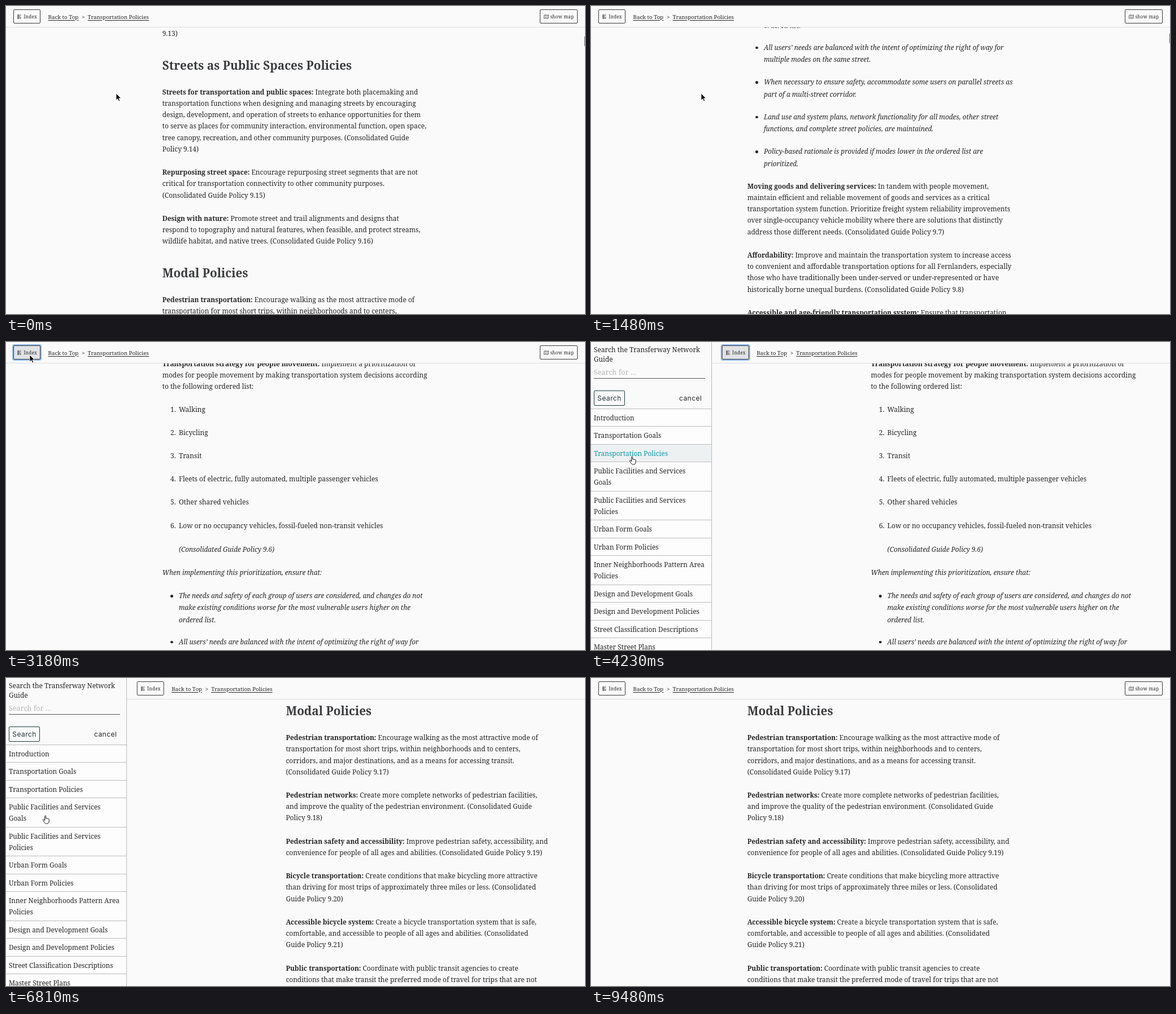
An HTML page for the animation above (9.71 s loop, 1025 px wide and 546 px high).

```html
<!DOCTYPE html>
<html lang="en">
<head>
<meta charset="utf-8">
<title>Policy reader</title>
<style>
html, body { margin: 0; width: 100%; height: 100%; overflow: hidden; background: #fafafa; }
body { position: relative; font: 11.95px/20.25px "Noto Serif", serif; color: #262626; white-space: nowrap; }
#page, #doc, #side, #side > *, #bar, #bar > *, #doc > *, #thumb, #cursor { position: absolute; }
#page { left: 0; top: 0; width: 1025px; height: 546px; }
#doc { left: 276.7px; top: 0; width: 473px; }
#doc h1, #doc h2 { margin: 0; line-height: 30px; color: #3b3c3e; }
#doc h1 { font-size: 23.1px; }
#doc h2 { font-size: 20.75px; }
#doc p { margin: 0; }
#doc b { font-size: 11.85px; }
#doc i { font-size: 11.78px; }
#doc hr { margin: 0; border: 0; width: 473px; height: 6px; background: #00a0ae; }
#doc .in { left: 29.2px; }
#doc .mark { position: absolute; left: -14.8px; }
#doc .dot { position: absolute; left: -14.5px; top: 9px; width: 4.4px; height: 4.4px; border-radius: 50%; background: #262626; }
#bar { left: -5px; top: 0; width: 1035px; height: 37px; background: #fafafa; border-bottom: 1px solid #dedede; }
.btn { box-sizing: border-box; top: 6px; height: 25px; border: 1px solid #3a3a3a; border-radius: 2px;
  font-size: 8px; line-height: 23px; letter-spacing: .35px; padding-left: 17px; }
.btn svg { position: absolute; left: 6px; top: 8px; }
.focus { background: #e0e2e4; box-shadow: 0 0 0 2px #8ab6ee; }
.crumb { top: 9.5px; font-size: 9.8px; }
u { text-underline-offset: 2px; }
#side { left: 0; top: 0; width: 213px; height: 546px; overflow: hidden; background: #fafafa; border-right: 1px solid #bbb; }
#title { left: 5px; top: 4.5px; line-height: 17px; }
#field { left: 5px; top: 44px; width: 197px; height: 20px; font-size: 12.5px; color: #b9b9b9; border-bottom: 1px solid #555; }
.ui { top: 86px; font: 400 12px/25px Inter, sans-serif; letter-spacing: .45px; }
#go { left: 5px; box-sizing: border-box; width: 55px; height: 27px; border: 1px solid #1f3a3a; border-radius: 2px; text-align: center; color: #1f3434; }
#cancel { left: 156px; top: 87px; }
.list { left: 0; top: 118px; width: 213px; border-top: 1px solid #bbb; background: #fdfdfd; }
.list div { padding: 5.075px 5px; border-bottom: 1px solid #bbb; font-size: 11.85px; }
.list .on { color: #0a99a6; }
#main .on:nth-child(3) { background: #eef1f2; }
#fig { left: 0; top: 0; font-family: "Liberation Sans", Arial, sans-serif; font-size: 4.75px; fill: #222; }
#fig .b { font-weight: bold; font-size: 4.6px; }
#fig .m { text-anchor: middle; }
#fig .i { font-style: italic; font-size: 4.1px; }
#thumb { right: 0; width: 1.5px; height: 17px; background: #666; }
#cursor { left: 0; top: 0; overflow: visible; }
</style>
</head>
<body>
<div id="page">
  <div id="doc"></div>
  <div id="bar">
    <div id="index" class="btn" style="left:18.4px;width:48px"><svg width="8" height="8"><path d="M0 1h7M0 3h5M0 5h7M0 7h7M1.5 0v8" stroke="#333" fill="none" stroke-width=".8"/></svg>Index</div>
    <u class="crumb" style="left:79.5px">Back to Top</u>
    <span class="crumb" style="left:139px">&gt;</span>
    <u class="crumb" style="left:149.5px">Transportation Policies</u>
    <div class="btn" style="left:950.4px;width:67px"><svg width="9" height="8"><path d="M.5 1.5 3 .7 6 1.5 8.5 .7V6.5L6 7.3 3 6.5 .5 7.3ZM3 .7V6.5M6 1.5V7.3" stroke="#333" fill="none" stroke-width=".7"/></svg>show map</div>
  </div>
</div>
<div id="side">
  <div id="title">Search the Transferway Network<br>Guide</div>
  <div id="field">Search for …</div>
  <div id="go" class="ui">Search</div>
  <div id="cancel" class="ui">cancel</div>
  <div id="main" class="list"></div>
  <div id="sub" class="list"></div>
  <svg id="fig" width="213" height="546"></svg>
</div>
<div id="thumb"></div>
<svg id="cursor" width="14" height="16">
  <path id="arrow" d="M0 0V12L2.8 9.4 4.7 13.8 6.7 13 4.8 8.7H8.6Z" fill="#000" stroke="#fff" stroke-width=".8"/>
  <path id="hand" d="M3.6 1.2c0-1.4 2-1.4 2 0v4c.3-.9 1.8-.8 1.9 .2 .4-.8 1.8-.6 1.9 .4 .5-.7 1.8-.3 1.8 .8v3c0 2.6-1.5 4.6-3.9 4.6H6.3c-1.5 0-2.3-.8-3.2-2.2L.6 8.3c-.8-1.3 .7-2.1 1.6-1.1l1.4 1.5z" fill="#fff" stroke="#111"/>
</svg>
<script>
const $ = id => document.getElementById(id);
const LOOP = 9710, LINE = 20.25, GAP = 20.95, SHIFT = 218.7;
const br = s => s.replaceAll('|', '<br>');
const ref = n => `(Consolidated Guide Policy 9.${n})`;

// [kind, text, marker or anchor]
const blocks = [
  ['hr', '', 'top'],
  ['h1', 'Transportation Policies'],
  ['p', '(Consolidated Guide Chapter 9)'],
  ['h2', 'Design and Planning Policies'],
  ['p', `<b>Street design classifications:</b> Maintain and implement street design|classifications consistent with land use plans, environmental context, urban design|pattern areas, and the Neighborhood Corridor and Civic Corridor Urban Design|Framework designations. ${ref(1)}`],
  ['p', `<b>Street policy classifications:</b> Maintain and implement street policy classifications|for pedestrian, bicycle, transit, freight, emergency vehicle, and automotive|movement, while considering access for all modes, connectivity, adjacent planned|land uses, and state and regional requirements. ${ref(2)}`],
  ['in', `<b>a:</b> Designate district classifications that emphasize freight mobility and|access in industrial and employment areas serving high levels of truck|traffic and to accommodate the needs of intermodal freight movement.|${ref('2.a')}`],
  ['in', '<b>b:</b> Integrate the needs of all modes of'],
  ['p', '<b>Transportation strategy for people movement:</b> Implement a prioritization of|modes for people movement by making transportation system decisions according|to the following ordered list:'],
  ['in', 'Walking', '1.'],
  ['in', 'Bicycling', '2.'],
  ['in', 'Transit', '3.'],
  ['in', 'Fleets of electric, fully automated, multiple passenger vehicles', '4.'],
  ['in', 'Other shared vehicles', '5.'],
  ['in', 'Low or no occupancy vehicles, fossil-fueled non-transit vehicles', '6.'],
  ['in', `<i>${ref(6)}</i>`],
  ['p', '<i>When implementing this prioritization, ensure that:</i>'],
  ['in', '<i>The needs and safety of each group of users are considered, and changes do not|make existing conditions worse for the most vulnerable users higher on the|ordered list.</i>', '•'],
  ['in', '<i>All users’ needs are balanced with the intent of optimizing the right of way for|multiple modes on the same street.</i>', '•'],
  ['in', '<i>When necessary to ensure safety, accommodate some users on parallel streets as|part of a multi-street corridor.</i>', '•'],
  ['in', '<i>Land use and system plans, network functionality for all modes, other street|functions, and complete street policies, are maintained.</i>', '•'],
  ['in', '<i>Policy-based rationale is provided if modes lower in the ordered list are|prioritized.</i>', '•'],
  ['p', `<b>Moving goods and delivering services:</b> In tandem with people movement,|maintain efficient and reliable movement of goods and services as a critical|transportation system function. Prioritize freight system reliability improvements|over single-occupancy vehicle mobility where there are solutions that distinctly|address those different needs. ${ref(7)}`, 'goods'],
  ['p', `<b>Affordability:</b> Improve and maintain the transportation system to increase access|to convenient and affordable transportation options for all Fernlanders, especially|those who have traditionally been under-served or under-represented or have|historically borne unequal burdens. ${ref(8)}`],
  ['p', `<b>Accessible and age-friendly transportation system:</b> Ensure that transportation|facilities are accessible to people of all ages and abilities, and that all|improvements to the system in the public right-of-way are easy to reach. Adapt|the transportation system to better meet the needs of the most vulnerable|users, including the young, older adults, and people with different abilities.|${ref(9)}`],
  ['p', `<b>Geographic policies:</b> Adopt geographically-specific policies to ensure that|transportation infrastructure reflects the unique topography, historic character,|natural features, system gaps, economic needs, demographics, and land uses of|each area. ${ref(10)}`],
  ['h2', 'Land Use, Development, and Placemaking Policies'],
  ['p', `<b>Land use and transportation coordination:</b> Implement the land use map and|the transportation plans and street classifications through coordinated long-|range planning and investment decisions. ${ref(11)}`],
  ['p', `<b>Growth strategy:</b> Coordinate land use and transportation to support growth|in centers and along corridors. ${ref(12)}`],
  ['p', '<b>Development and street design:</b> Evaluate adjacent land uses to help inform|street classifications in framing street, sidewalk, and trail design and use to|support complementary development. (Consolidated Guide Policy|9.13)'],
  ['h2', 'Streets as Public Spaces Policies', 'streets'],
  ['p', '<b>Streets for transportation and public spaces:</b> Integrate both placemaking and|transportation functions when designing and managing streets by encouraging|design, development, and operation of streets to enhance opportunities for them|to serve as places for community interaction, environmental function, open space,|tree canopy, recreation, and other community purposes. (Consolidated Guide|Policy 9.14)'],
  ['p', `<b>Repurposing street space:</b> Encourage repurposing street segments that are not|critical for transportation connectivity to other community purposes.|${ref(15)}`],
  ['p', `<b>Design with nature:</b> Promote street and trail alignments and designs that|respond to topography and natural features, when feasible, and protect streams,|wildlife habitat, and native trees. ${ref(16)}`],
  ['h2', 'Modal Policies', 'modal'],
  ['p', `<b>Pedestrian transportation:</b> Encourage walking as the most attractive mode of|transportation for most short trips, within neighborhoods and to centers,|corridors, and major destinations, and as a means for accessing transit.|${ref(17)}`],
  ['p', '<b>Pedestrian networks:</b> Create more complete networks of pedestrian facilities,|and improve the quality of the pedestrian environment. (Consolidated Guide|Policy 9.18)'],
  ['p', `<b>Pedestrian safety and accessibility:</b> Improve pedestrian safety, accessibility, and|convenience for people of all ages and abilities. ${ref(19)}`],
  ['p', '<b>Bicycle transportation:</b> Create conditions that make bicycling more attractive|than driving for most trips of approximately three miles or less. (Consolidated|Guide Policy 9.20)'],
  ['p', '<b>Accessible bicycle system:</b> Create a bicycle transportation system that is safe,|comfortable, and accessible to people of all ages and abilities. (Consolidated|Guide Policy 9.21)'],
  ['p', '<b>Public transportation:</b> Coordinate with public transit agencies to create|conditions that make transit the preferred mode of travel for trips that are not|made by walking or bicycling.']
];

const marker = tag => !tag ? '' : tag === '•' ? '<span class="dot"></span>' : `<span class="mark">${tag}</span>`;

// y is the centre of the next first line
const at = {};
let y = 0;
for (const [kind, text, tag] of blocks) {
  const inset = kind === 'in';
  const el = document.createElement(inset ? 'p' : kind);
  if (inset) el.className = 'in';
  if (kind === 'h2') y += 16;
  const half = { hr: 3, h1: 15.5, h2: 15.5 }[kind] || LINE / 2;
  el.style.top = y - half + 'px';
  if (kind !== 'hr') el.innerHTML = (inset ? marker(tag) : '') + br(text);
  if (tag) at[tag] = y;
  y += { hr: 50.5, h1: 44.7, h2: 46.6 }[kind] || text.split('|').length * LINE + GAP;
  $('doc').append(el);
}
const stops = [at.streets - 105, at.goods - 319, at['1.'] - 39, at['1.'] - 120, at.top - 47, at.modal - 58.4];

const fill = (id, items) => $(id).innerHTML = items.map(s => `<div>${br(s)}</div>`).join('');
fill('main', ['Introduction', 'Transportation Goals', 'Transportation Policies', 'Public Facilities and Services|Goals',
  'Public Facilities and Services|Policies', 'Urban Form Goals', 'Urban Form Policies', 'Inner Neighborhoods Pattern Area|Policies',
  'Design and Development Goals', 'Design and Development Policies', 'Street Classification Descriptions', 'Master Street Plans']);
fill('sub', ['Design and Planning Policies', 'Land Use, Development, and|Placemaking Policies', 'Streets as Public Spaces Policies',
  'Modal Policies', 'Airport Futures Policies', 'System Management Policies']);

const label = (x, y, text, cls = '', lead = 6.8) => text.split('|')
  .map((s, i) => `<text x="${x}" y="${y + 1.7 + i * lead}" class="${cls}">${s}</text>`).join('');
const values = (y, ...v) => v.map((s, i) => label([109, 145, 180][i], y, s, 'b m')).join('');
const red = s => `<tspan text-decoration="underline" style="text-decoration-color:#d33">${s}</tspan>`;
$('fig').innerHTML =
  '<path d="M0 327.5H213V540.5H0" fill="#fafafa" stroke="none"/><path d="M0 540.5H213" stroke="#bbb"/>' +
  '<path d="M7 334H198.5V526H7ZM7 346.5H198.5M91 366H198.5M127.5 382H198.5M7 399H198.5M7 428H198.5M7 478H198.5M7 494H198.5M91 346.5V494M127.5 366V494M162 382V494" fill="#fff" stroke="#444" stroke-width=".8"/>' +
  label(9, 340, 'Interim Deficiency Thresholds and Operating Standards (Figure 9-4)', 'b') +
  label(9, 356, 'Location', 'b') + label(94, 356, 'Standards', 'b') +
  label(93.5, 372, 'Mid-Day|One-Hour|Peak*') + label(130, 372, 'PM 2-Hour Peak*') +
  label(131, 388, '1ˢᵗ Hour') + label(165, 388, '2ⁿᵈ Hour') +
  label(9.5, 404.5, 'Central City, Eastway, Town|Centers, Neighborhood Centers,|Station Areas') + values(404.5, '.99', '1.1', '.99') +
  label(9.5, 434, 'R-84 (from R-5 to R-205), R-5 North|(from Tarvell Bridge to|Hollowick Bridge, SR 99-E (from|Corvane St. to SR 224),SR 26|(from R-405 to Orwick|Interchange), R-405') + values(434, '.99', '1.1', '.99') +
  label(9.5, 484, 'Other Principal Arterial Routes') + values(484, '.90', '.99', '.99') +
  label(9, 500, `*The demand-to-capacity ratios in the table are for the highest two consecutive hours of the|weekday traffic volumes. The mid-day peak hour is the highest 60-minute period between the|hours of ${red('9 a.m.')} and ${red('3 p.m.')} The 2nd hour is defined as the single 60-minute period, either before|or after the peak 60-minute period, whichever is highest.`, 'i', 5.6);

// Tracks hold each value until the next time.
const scroll = [[0, 0], [150, .08], [350, .2], [890, .32], [1090, .55], [1290, .8], [1480, 1], [1680, 1.35], [1770, 1.55],
  [1860, 1.7], [2030, 1.85], [2200, 2], [2380, 2.5], [2540, 2.85], [2700, 3], [4730, 4], [6420, 5]];
const open = [[0, 0], [3335, .35], [3490, .8], [3645, 1], [8000, .7], [8177, .2], [8353, 0]];
const hover = [[0, ''], [4110, 'main2'], [4910, ''], [5420, 'sub2'], [5950, 'sub3'], [6600, ''], [7140, 'main3'], [7300, '']];
const focus = [[0, 0], [3180, 1], [4730, 0]];
const sub = [[0, 0], [4910, 1], [6600, 0]];
const pointer = [[0, 195, 155], [2540, 170, 130], [2700, 115, 80], [2860, 60, 36], [3030, 42, 23], [3800, 48, 70], [3955, 62, 150],
  [4110, 70, 203], [4230, 68, 203, 1], [5420, 67.5, 211, 1], [5660, 67, 220, 1], [5805, 66, 229, 1], [5950, 65, 238, 1],
  [6150, 65, 244, 1], [7140, 120, 244, 1], [7300, 260, 240], [7460, 355, 236], [8177, 520, 300], [8353, 720, 390], [8530, 845, 438],
  [8860, 868, 452], [8984, 905, 474], [9108, 945, 498], [9232, 985, 520], [9356, 1012, 538], [9480, 1100, 600]];

const hold = (track, t) => track.findLast(k => k[0] <= t);
const value = (track, t) => hold(track, t)[1];

function draw(t) {
  const s = value(scroll, t), i = Math.floor(s), o = value(open, t);
  const top = stops[i] + (s - i) * ((stops[i + 1] ?? 0) - stops[i]);
  $('doc').style.transform = `translateY(${-Math.round(top)}px)`;
  $('page').style.transform = `translateX(${o * SHIFT}px)`;
  $('side').style.transform = `translateX(${(o - 1) * 214}px)`;
  $('index').classList.toggle('focus', !!value(focus, t));

  const nested = value(sub, t), h = value(hover, t);
  $('main').style.display = nested ? 'none' : '';
  $('sub').style.display = $('fig').style.display = nested ? '' : 'none';
  for (const id of ['main', 'sub'])
    [...$(id).children].forEach((el, n) => el.classList.toggle('on', h === id + n));

  $('thumb').style.display = t < 3030 ? '' : 'none';
  $('thumb').style.top = 54 - 5 * Math.min(s, 1) - 2 * Math.max(0, s - 1) + 'px';

  const [, x, cy, hand] = hold(pointer, t);
  $('cursor').style.transform = `translate(${x}px, ${cy}px)`;
  $('hand').style.display = hand ? '' : 'none';
  $('arrow').style.display = hand ? 'none' : '';
}

const start = performance.now();
function tick() {
  draw((performance.now() - start) % LOOP);
  requestAnimationFrame(tick);
}
tick();
</script>
</body>
</html>
```
